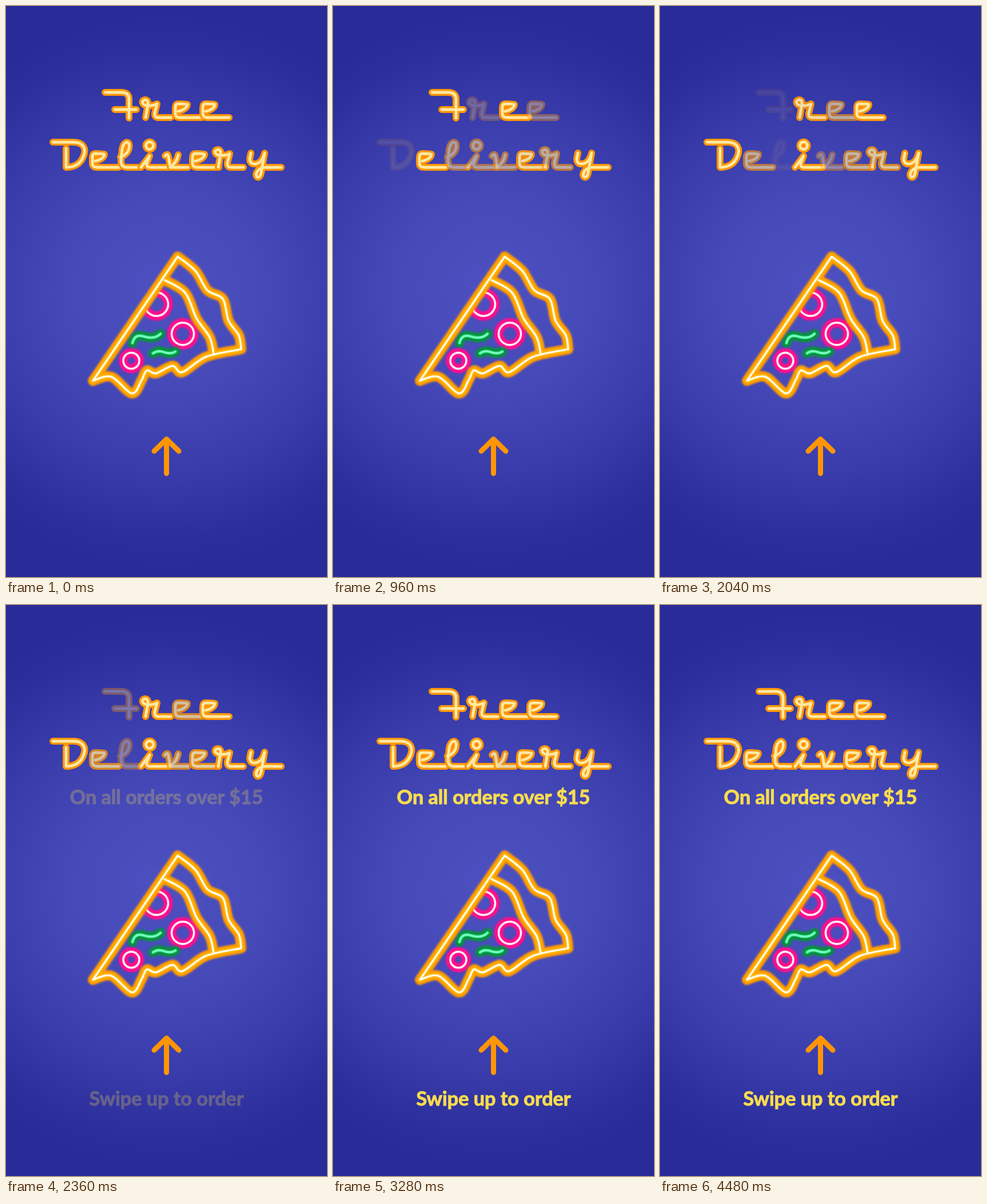
Animation of 561x998 px, one loop 4520 ms. Source, as an HTML page:

```html
<!DOCTYPE html>
<html lang="en">
<head>
<meta charset="utf-8">
<title>Free Delivery</title>
<style>
  html, body { margin: 0; width: 100%; height: 100%; overflow: hidden; background: #292b99; }
  svg { display: block; width: 100vw; height: 100vh; }
  path, circle { fill: none; stroke-linecap: round; stroke-linejoin: round; }
  text { font: 700 34.2px Lato, sans-serif; fill: #f9dc4f; stroke: #f9dc4f; stroke-width: 1; text-anchor: middle; }
</style>
</head>
<body>
<svg viewBox="0 0 561 998">
  <defs>
    <radialGradient id="night" gradientUnits="userSpaceOnUse" cx="280" cy="499" r="480">
      <stop offset="0" stop-color="#4d50c0"/>
      <stop offset=".35" stop-color="#464ab8"/>
      <stop offset=".65" stop-color="#393caa"/>
      <stop offset=".9" stop-color="#2c2e9c"/>
      <stop offset="1" stop-color="#292b99"/>
    </radialGradient>
    <filter id="soft" filterUnits="userSpaceOnUse" x="120" y="400" width="330" height="320">
      <feGaussianBlur stdDeviation="1.6"/>
    </filter>
  </defs>
  <rect width="561" height="998" fill="url(#night)"/>
  <g id="sign" role="img" aria-label="Free Delivery"></g>
  <g id="pizza"></g>
  <path d="M280.5 758V817M259 778L280.5 757L302 778" stroke="#ff9505" stroke-width="9"/>
  <g id="captions">
    <text x="280.5" y="348">On all orders over $15</text>
    <text x="280.5" y="875">Swipe up to order</text>
  </g>
</svg>
<script>
const LOOP = 4520, FADE = 900;
const $ = id => document.getElementById(id);
const clamp = x => Math.max(0, Math.min(1, x));

// Stack strokes of one shape, each layer: [colour, width, blurred]
const tube = (shape, layers) => layers.map(([colour, width, blurred]) =>
  `<${shape} stroke="${colour}" stroke-width="${width}"${blurred ? ' filter="url(#soft)"' : ''}/>`).join('');

// Smooth path through a few points, written "x,y x,y ..."
function curve(list) {
  const points = list.split(' ').map(pair => pair.split(',').map(Number));
  const at = i => points[Math.max(0, Math.min(points.length - 1, i))];
  const lean = (from, a, b) => from.map((v, k) => v + (b[k] - a[k]) / 6);
  return points.slice(1).reduce((d, end, i) =>
    `${d}C${lean(at(i), at(i - 1), end)} ${lean(end, at(i + 2), at(i))} ${end}`, 'M' + points[0]);
}

// Lettering: each letter dims around the given moments by the given depths
const r = 'M244 195L248 172Q249 164 243 164Q237 165 239 170Q241 174 248 174Q257 175 264 171L260 187Q259 195 266 195H288';
const e = 'M301 184C311 182 317 177 317 172Q316 171 301 171Q296 171 296 177V188Q296 195 304 195H342';
const letters = [
  { d: 'M173 151H202Q215 151 215 163V196M190 181H228', dips: [[2080, .95]] },
  { d: r, dips: [[1200, 1]] },
  { d: e, dips: [[2040, .35]] },
  { d: e, x: 48, dips: [[980, .6]] },
  { d: 'M82 238H118C136 238 140 250 136 261C131 276 119 282 105 282V249', dips: [[980, .9]] },
  { d: e, x: -145, y: 87, dips: [[2040, .35]] },
  { d: 'M200 264C212 260 217 250 215 241C212 235 205 239 203 250L201 270Q201 282 211 282H236', dips: [[520, .85], [2060, .95]] },
  { d: 'M257.5 244A6.5 6.5 0 1 0 257.5 244.1M236 282L251 262L246 275Q245 282 252 282H284', dips: [[520, .85]] },
  { d: 'M278 262Q283 256 284 264L287 281Q298 275 301 260M287 282H318', dips: [[520, .8], [1700, .95], [2680, .3]] },
  { d: e, x: 30, y: 87, dips: [[1700, .5]] },
  { d: r, x: 127, y: 87, dips: [[1400, .7]] },
  { d: 'M428 257L426 267Q426 277 436 276Q448 274 452 257L446 291Q444 301 439 299Q435 295 440 288Q445 282 455 282H481', dips: [] }
];
$('sign').innerHTML = letters.map(({ d, x = 0, y = 0 }) => `<g transform="translate(${x} ${y})">` +
  tube(`path d="${d}"`, [['#ff9505', 12], ['#ffe9a3', 4.8]]) + '</g>').join('');

// Pizza slice
const rim = curve('411,600 407,576 389,550 379,512 352,497 331,463 300,438');
const drips = curve('152,655 184,648 220,677 237,654 246,637 262,642 291,629 308,640 350,613 411,600');
const crust = curve('277,479 313,501 333,546 356,579 363,609');
const cheese = [['#ff9a05', 18, true], ['#ffb400', 9, true], ['#ffc52e', 5], ['#fff', 3]];
const pepperoni = [['#ff0a8c', 16, true], ['#ff4bab', 5], ['#fff', 3]];
const herb = [['#078c43', 17, true], ['#19d878', 6], ['#7dffbd', 3.2]];
$('pizza').innerHTML =
  tube('path d="M260 501A20.5 20.5 0 1 1 243 526"', pepperoni) +
  tube('circle cx="309" cy="573" r="19.5"', pepperoni) +
  tube('circle cx="219" cy="620" r="14"', pepperoni) +
  tube('path d="M221 589C224 577 231 575 239 577C251 581 262 581 270 573"', herb) +
  tube('path d="M257 607Q265 601 276 605Q288 609 296 604"', herb) +
  tube(`path d="${rim}L152 655${drips.replace('M', 'L')}Z${crust}"`, cheese);

const glyphs = [...$('sign').children];
function draw(t) {
  const onset = clamp(t / 300);
  letters.forEach(({ dips }, i) => {
    const dim = Math.max(0, ...dips.map(([time, depth]) => depth * (1 - Math.abs(t - time) / FADE)));
    glyphs[i].setAttribute('opacity', 1 - dim * onset);
  });
  $('captions').setAttribute('opacity', clamp((t - 2200) / 600));
}
const start = performance.now();
(function tick() {
  draw((performance.now() - start) % LOOP);
  requestAnimationFrame(tick);
})();
</script>
</body>
</html>
```
